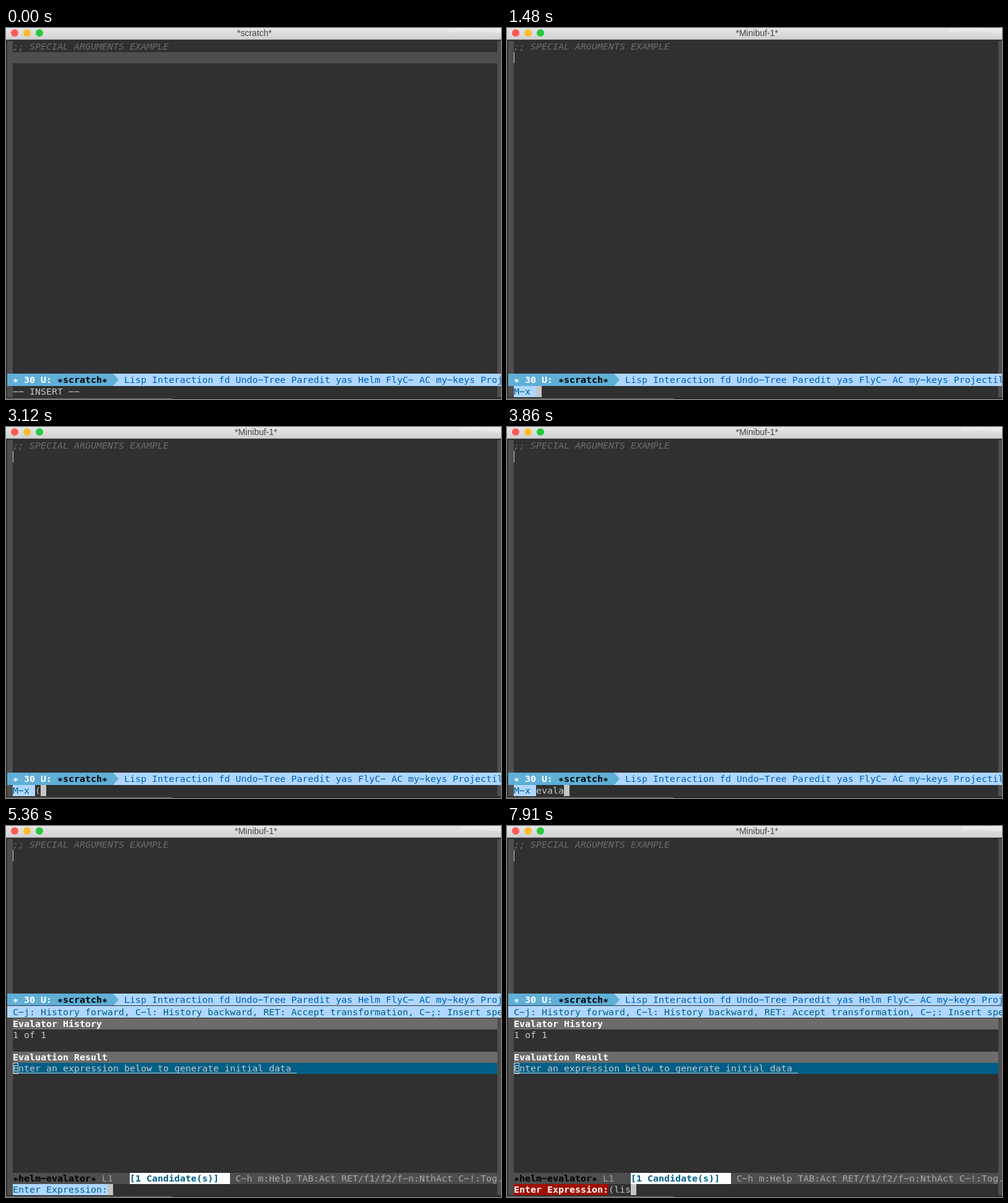
Recreate the animation shown at these times as an HTML page with a canvas. Size 800 by 600 pixels, loop 8000 ms.

```html
<!DOCTYPE html>
<html lang="en">
<head>
<meta charset="utf-8">
<title>Editor session</title>
<style>
  html, body { margin: 0; width: 100%; height: 100%; overflow: hidden; background: #303030; }
  canvas { display: block; }
</style>
</head>
<body>
<canvas id="stage" width="800" height="600"></canvas>
<script>
const ctx = document.getElementById('stage').getContext('2d');
const LOOP = 8000, CELL = 9, LEFT = 11, RIGHT = 794;
const BG = '#303030', FRINGE = '#4e4e4e', FG = '#c6c6c6', PALE = '#afd7ff', TEAL = '#005f87';

// Prompt line over time: [start, typed text, cursor visible]
const KEYS = [
  [1480, '', 1], [1920, '', 0], [2520, '(', 1], [2820, '(l', 1], [3120, '(', 1],
  [3270, '', 1], [3410, 'e', 1], [3560, 'eva', 1], [3710, 'eval', 1], [3860, 'evala', 1],
  [4010, 'evalat', 1], [4160, 'evalato', 1], [4460, 'evalator', 1], [4910, 'evalator', 0],
  [5360, '', 1], [5960, '', 0], [6410, '', 1], [6860, '', 0],
  [7460, '(', 1], [7760, '(li', 1], [7910, '(lis', 1]
];

function rect(x1, y1, x2, y2, color) {
  ctx.fillStyle = color;
  ctx.fillRect(x1, y1, x2 - x1, y2 - y1);
}

// Monospaced text on the cell grid, with wide hyphens and centred asterisks
function text(str, x, y, color, style = '') {
  ctx.font = style + ' 14.95px "DejaVu Sans Mono", monospace';
  ctx.fillStyle = color;
  ctx.textAlign = 'left';
  [...str].forEach((c, i) =>
    ctx.fillText(c === '-' ? '\u2212' : c, x + i * CELL, y + (c === '*' ? 3 : 0)));
}

function titleBar(title, center, cloud) {
  const shade = ctx.createLinearGradient(0, 0, 0, 18);
  shade.addColorStop(0, '#e6e6e6');
  shade.addColorStop(1, '#d2d2d2');
  rect(0, 0, 800, 18, shade);
  rect(0, 18, 800, 19, '#a8a8a8');
  ctx.fillStyle = 'rgba(255,255,255,.25)';
  ctx.beginPath();
  ctx.moveTo(cloud, 8);
  ctx.lineTo(cloud + 22, 5);
  ctx.lineTo(770, 6);
  ctx.lineTo(800, 9);
  ctx.lineTo(800, 0);
  ctx.lineTo(cloud, 0);
  ctx.fill();
  ['#fc5b57', '#fdbb2e', '#27c93f'].forEach((color, i) => {
    ctx.fillStyle = color;
    ctx.beginPath();
    ctx.arc(14 + i * 20, 8, 6, 0, 7);
    ctx.fill();
  });
  ctx.font = '14px "Liberation Sans", Arial, sans-serif';
  ctx.fillStyle = '#444';
  ctx.textAlign = 'center';
  ctx.fillText(title, center, 13);
}

function modeLine(y, helm) {
  rect(2, y, 800, y + 20, PALE);
  rect(2, y, 173, y + 20, '#5fafd7');
  ctx.fillStyle = '#5fafd7';
  ctx.beginPath();
  ctx.moveTo(173, y);
  ctx.lineTo(182, y + 10);
  ctx.lineTo(173, y + 20);
  ctx.fill();
  text('* 30 U:', LEFT, y + 15, '#fff', 'bold');
  text('*scratch*', 83, y + 15, '#000', 'bold');
  text(`Lisp Interaction fd Undo-Tree Paredit yas ${helm ? 'Helm ' : ''}FlyC- AC my-keys Projectile`,
    191, y + 15, '#005faf');
}

function heading(str, y) {
  rect(LEFT, y, RIGHT, y + 18, '#6c6c6c');
  text(str, LEFT, y + 14, '#fff', 'bold');
}

function helmWindow() {
  rect(2, 291, 800, 310, PALE);
  rect(2, 290, 800, 291, BG);
  rect(0, 310, 800, 311, BG);
  text('C-j: History forward, C-l: History backward, RET: Accept transformation, C-;: Insert special',
    LEFT, 306, TEAL);
  heading('Evalator History', 311);
  text('1 of 1', LEFT, 343, FG);
  heading('Evaluation Result', 365);
  rect(LEFT, 383, RIGHT, 401, TEAL);
  text('Enter an expression below to generate initial data', LEFT, 397, FG);
  rect(LEFT, 399, 470, 400, FG);
  ctx.strokeStyle = FG;
  ctx.strokeRect(11.5, 383.5, 8, 17);
  rect(2, 561, 800, 579, FRINGE);
  text('*helm-evalator*', LEFT, 575, '#000', 'bold');
  text('L1', 155, 575, '#9e9e9e');
  rect(200, 561, 362, 579, '#fff');
  text('[1 Candidate(s)]', 200, 575, TEAL, 'bold');
  text('C-h m:Help TAB:Act RET/f1/f2/f-n:NthAct C-!:Tog.', 371, 575, '#a8a8a8');
}

function promptLine(label, typed, cursor, alert) {
  const end = LEFT + label.length * CELL;
  rect(LEFT, 579, end, 597, alert ? '#a01000' : PALE);
  text(label, LEFT, 593, alert ? '#fff' : TEAL, alert ? 'bold' : '');
  text(typed, end, 593, FG);
  const x = end + typed.length * CELL;
  if (cursor) rect(x, 579, x + CELL, 597, FG);
}

function draw(t) {
  const key = KEYS.filter(k => k[0] <= t).pop();
  const helm = t >= 5360;
  rect(0, 0, 800, 600, BG);
  rect(2, 21, LEFT, 597, FRINGE);
  rect(RIGHT, 21, 800, 597, FRINGE);
  rect(0, 599, 269, 600, '#707070');
  rect(269, 599, 800, 600, '#181818');
  titleBar(key ? '*Minibuf-1*' : '*scratch*', key ? 404 : 401.5, t < 2520 ? 715 : 735);
  if (!key) rect(LEFT, 39, RIGHT, 57, FRINGE);
  text(';; SPECIAL ARGUMENTS EXAMPLE', LEFT, 35, '#6c6c6c', 'italic');
  modeLine(helm ? 271 : 559, helm || !key);
  if (helm) helmWindow();
  if (key) {
    rect(LEFT, 39, LEFT + 1, 57, FG);
    promptLine(helm ? 'Enter Expression:' : 'M-x ', key[1], key[2], t >= 7460);
  } else {
    if (t >= 600 && t < 1040) rect(LEFT, 39, LEFT + 2, 57, FG);
    text('-- INSERT --', LEFT, 593, FG);
  }
}

const start = performance.now();
function tick() {
  draw((performance.now() - start) % LOOP);
  requestAnimationFrame(tick);
}
tick();
</script>
</body>
</html>
```
